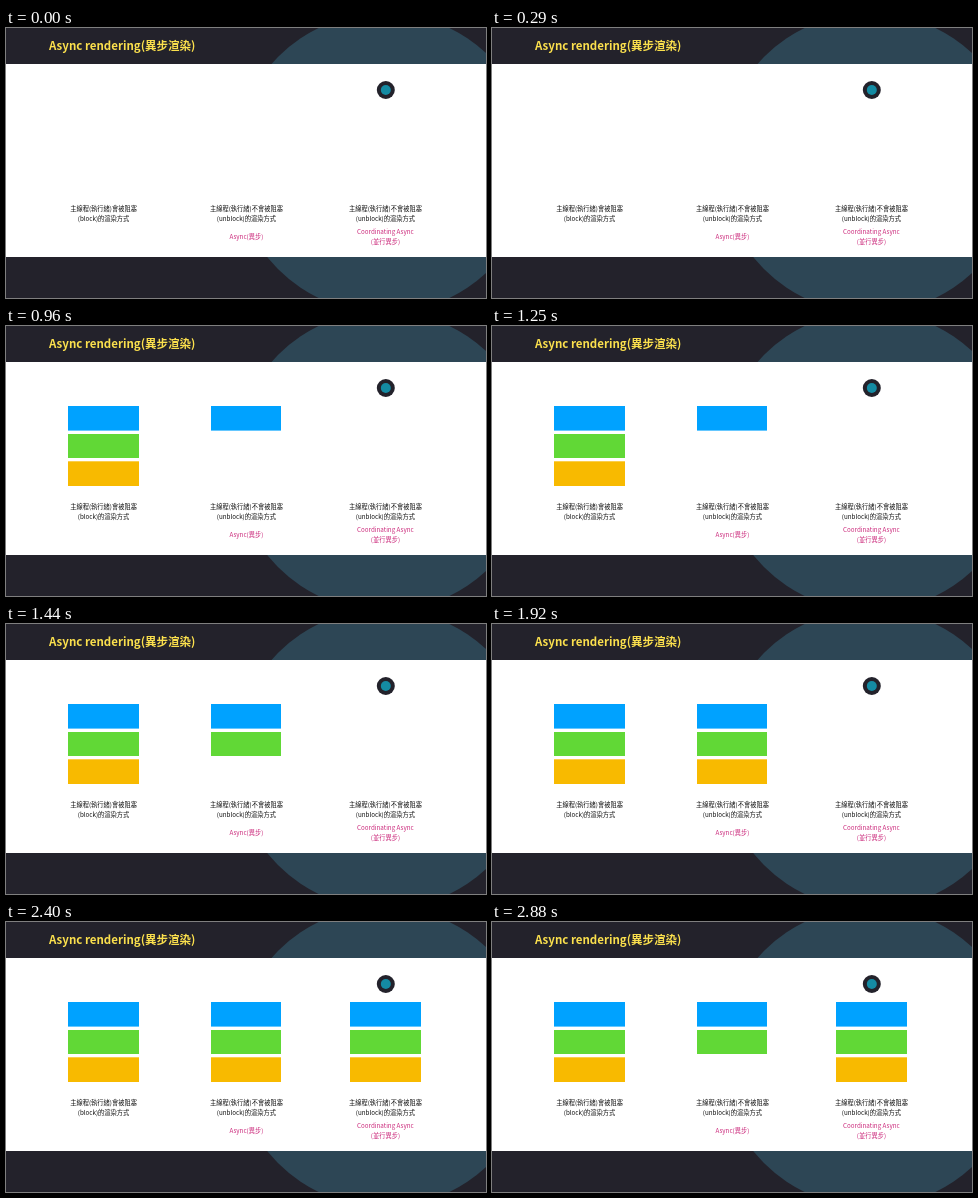
An HTML page for the animation above (2920 ms loop, 480x270 px).

```html
<!DOCTYPE html>
<html lang="zh-Hant">
<head>
<meta charset="utf-8">
<title>Async rendering</title>
<style>
  html, body { margin: 0; width: 100%; height: 100%; overflow: hidden; background: #23222b; }
  svg { display: block; width: 100vw; height: 100vh; }
  text { font: 6.25px "Noto Sans CJK TC", "Noto Sans CJK JP", "Noto Sans CJK", sans-serif; text-anchor: middle; fill: #111; }
  .title { font-size: 11.5px; font-weight: 700; text-anchor: start; fill: #fbe04d; }
  .note { fill: #cb297b; }
</style>
</head>
<body>
<svg id="stage" viewBox="0 0 480 270">
  <rect width="480" height="270" fill="#23222b"/>
  <circle cx="378" cy="135" r="150" fill="#2d4655"/>
  <rect y="36" width="480" height="193" fill="#fff"/>
  <text class="title" x="43" y="22">Async rendering(異步渲染)</text>
  <circle cx="379.8" cy="62" r="9" fill="#23222b"/>
  <circle cx="379.8" cy="62" r="5" fill="#148ba3"/>
</svg>
<script>
const LOOP = 2920;
const stage = document.getElementById('stage');

function add(tag, attrs, content = '') {
  const el = document.createElementNS('http://www.w3.org/2000/svg', tag);
  for (const key in attrs) el.setAttribute(key, attrs[key]);
  el.textContent = content;
  return stage.appendChild(el);
}

function showBetween(el, start, end) {
  el.animate([
    { opacity: 0, offset: 0, easing: 'step-end' },
    { opacity: 1, offset: start / LOOP, easing: 'step-end' },
    { opacity: 0, offset: end / LOOP, easing: 'step-end' },
    { opacity: 0, offset: 1 }
  ], { duration: LOOP, iterations: Infinity });
}

const bars = [
  { y: 80, height: 24.6, fill: '#00a2ff' },
  { y: 108, height: 24, fill: '#61d836' },
  { y: 135.3, height: 24.7, fill: '#f8ba00' }
];

const columns = [
  { x: 62, width: 71, center: 97.6, starts: [480, 480, 480],
    lines: [['主線程(執行緒)會被阻塞', 183.2], ['(block)的渲染方式', 192.8]], notes: [] },
  { x: 205, width: 70, center: 240.4, starts: [960, 1440, 1920], lastEnd: 2880,
    lines: [['主線程(執行緒)不會被阻塞', 183.2], ['(unblock)的渲染方式', 192.8]],
    notes: [['Async(異步)', 211]] },
  { x: 344, width: 71, center: 379.4, starts: [2400, 2400, 2400],
    lines: [['主線程(執行緒)不會被阻塞', 183.2], ['(unblock)的渲染方式', 192.8]],
    notes: [['Coordinating Async', 206], ['(並行異步)', 215.6]] }
];

for (const { x, width, center, starts, lastEnd = LOOP, lines, notes } of columns) {
  for (const [label, y] of lines) add('text', { x: center, y }, label);
  for (const [label, y] of notes) add('text', { x: center, y, class: 'note' }, label);
  bars.forEach((bar, i) => {
    showBetween(add('rect', { x, width, ...bar }), starts[i], i === 2 ? lastEnd : LOOP);
  });
}
</script>
</body>
</html>
```
